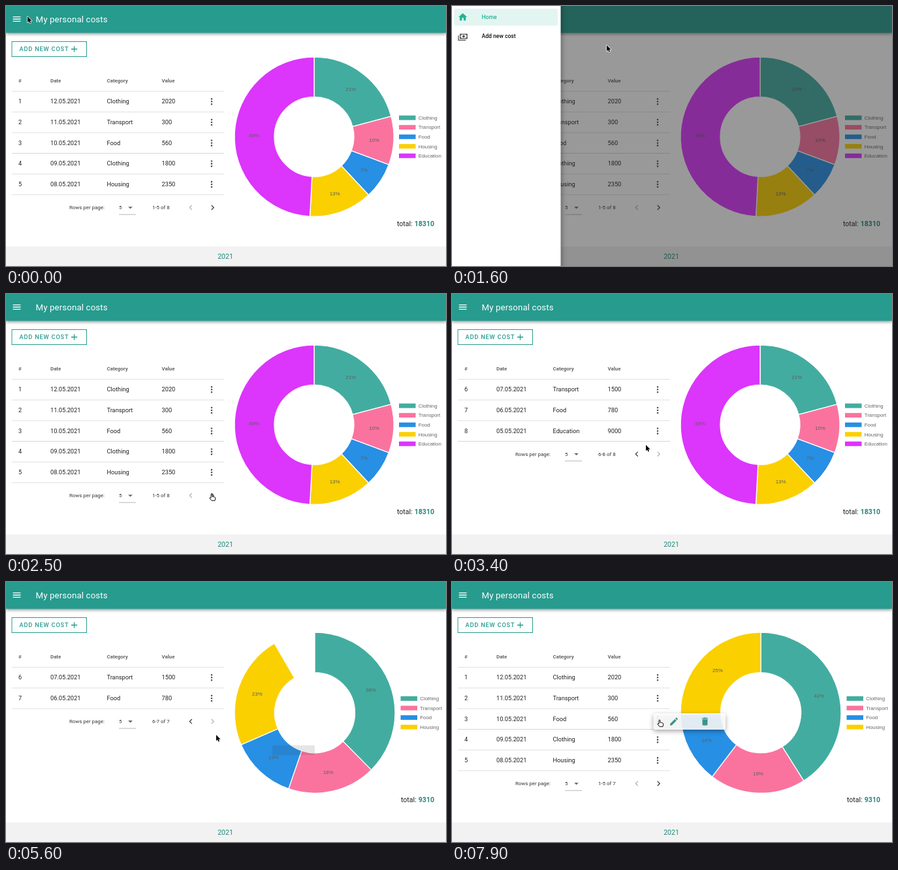
An HTML page with a canvas that plays this animation: 674 by 398 pixels, repeating every 8000 ms.

```html
<!DOCTYPE html>
<html lang="en">
<head>
<meta charset="utf-8">
<title>My personal costs</title>
<style>
  html, body { margin: 0; width: 100%; height: 100%; overflow: hidden; background: #fff; }
  canvas { display: block; width: 674px; height: 398px; }
</style>
</head>
<body>
<canvas id="stage"></canvas>
<script>
const W = 674, H = 398, LOOP = 8000, STEP = 100;
const canvas = document.getElementById('stage');
const ctx = canvas.getContext('2d');
const dpr = window.devicePixelRatio || 1;
canvas.width = W * dpr;
canvas.height = H * dpr;

const SANS = 'Roboto, sans-serif';
const CHART_FONT = '"Liberation Sans", Arial, sans-serif';
const TEAL = '#269b8e', DEEP_TEAL = '#20887c', INK = '#1f1f1f';

// Moments of the interaction, in ms
const OPEN_DRAWER = 550, CLOSE_DRAWER = 1605, NEXT_PAGE = 2750;
const OPEN_MENU = 4230, REMOVE = 5243, PREV_PAGE = 6550, OPEN_MENU_AGAIN = 7660;

const COLORS = {
  Clothing: '#43aca0', Transport: '#fa739f', Food: '#278fe4',
  Housing: '#fbd000', Education: '#dc35fc'
};

const COSTS = [
  ['12.05.2021', 'Clothing', 2020],
  ['11.05.2021', 'Transport', 300],
  ['10.05.2021', 'Food', 560],
  ['09.05.2021', 'Clothing', 1800],
  ['08.05.2021', 'Housing', 2350],
  ['07.05.2021', 'Transport', 1500],
  ['06.05.2021', 'Food', 780],
  ['05.05.2021', 'Education', 9000]
];

// time, x, y of the pointer tip
const PATH = [
  [0, 33, 16], [300, 17, 18], [800, 17, 18], [1600, 237, 60], [1800, 298, 113],
  [2350, 315, 306], [2900, 315, 306], [3400, 297, 231], [4000, 313, 208],
  [4350, 316, 211], [4600, 362, 217], [4850, 386, 212], [5200, 386, 212],
  [5600, 322, 234], [6150, 283, 212], [6700, 283, 212], [7300, 313, 208],
  [7700, 318, 211], [8000, 318, 211]
];
const HAND_TIMES = [[200, 1250], [1700, 1900], [2250, 3000], [3900, 5300], [6050, 6850], [7200, 8000]];

const ICONS = {
  menu: 'M3,6H21V8H3V6M3,11H21V13H3V11M3,16H21V18H3V16Z',
  home: 'M10,20V14H14V20H19V12H22L12,3L2,12H5V20H10Z',
  cash: 'M5,6H23V18H5V6M14,9A3,3 0 0,1 17,12A3,3 0 0,1 14,15A3,3 0 0,1 11,12A3,3 0 0,1 14,9M9,8A2,2 0 0,1 7,10V14A2,2 0 0,1 9,16H19A2,2 0 0,1 21,14V10A2,2 0 0,1 19,8H9M1,10H3V20H19V22H1V10Z',
  pencil: 'M20.71,7.04C21.1,6.65 21.1,6 20.71,5.63L18.37,3.29C18,2.9 17.35,2.9 16.96,3.29L15.12,5.12L18.87,8.87M3,17.25V21H6.75L17.81,9.93L14.06,6.18L3,17.25Z',
  trash: 'M19,4H15.5L14.5,3H9.5L8.5,4H5V6H19M6,19A2,2 0 0,0 8,21H16A2,2 0 0,0 18,19V7H6V19Z',
  left: 'M15.41,16.58L10.83,12L15.41,7.41L14,6L8,12L14,18L15.41,16.58Z',
  right: 'M8.59,16.58L13.17,12L8.59,7.41L10,6L16,12L10,18L8.59,16.58Z',
  plus: 'M19,13H13V19H11V13H5V11H11V5H13V11H19V13Z',
  caret: 'M7,10L12,15L17,10H7Z',
  dots: 'M12,16a2,2 0 1,1 0,4a2,2 0 1,1 0,-4M12,10a2,2 0 1,1 0,4a2,2 0 1,1 0,-4M12,4a2,2 0 1,1 0,4a2,2 0 1,1 0,-4Z'
};
for (const key in ICONS) ICONS[key] = new Path2D(ICONS[key]);

const ARROW = new Path2D('M0,0V9.2L2.1,7.3L3.5,10.4L5,9.7L3.7,6.7H6.6Z');
const HAND = new Path2D('M-1,0.9C-1,-0.3 0.8,-0.3 0.8,0.9V4L2.3,4.2L3.8,4.5L5,5C5.7,5.3 5.8,6 5.7,7L5,10.3H0L-2.8,6.9C-3.6,5.8 -2.4,5 -1.6,5.8L-1,6.4Z');

const clamp = v => Math.max(0, Math.min(1, v));
const lerp = (a, b, p) => a + (b - a) * p;
const smooth = p => p * p * (3 - 2 * p);
const progress = (t, start, length) => clamp((t - start) / length);

function text(str, x, y, size, color, { weight = 400, align = 'left', family = SANS, spacing = 0 } = {}) {
  ctx.font = `${weight} ${size}px ${family}`;
  ctx.letterSpacing = spacing + 'px';
  ctx.textAlign = align;
  ctx.fillStyle = color;
  ctx.fillText(str, x, y + size * 0.355);
}

function icon(name, cx, cy, color, size = 15.8) {
  ctx.save();
  ctx.translate(cx - size / 2, cy - size / 2);
  ctx.scale(size / 24, size / 24);
  ctx.fillStyle = color;
  ctx.fill(ICONS[name], 'evenodd');
  ctx.restore();
}

function box(x, y, w, h, color, radius = 0) {
  ctx.fillStyle = color;
  ctx.beginPath();
  ctx.roundRect(x, y, w, h, radius);
  ctx.fill();
}

function shadowBox(x, y, w, h, color, radius, blur, dy, alpha) {
  ctx.save();
  ctx.shadowColor = `rgba(0,0,0,${alpha})`;
  ctx.shadowBlur = blur * dpr;
  ctx.shadowOffsetY = dy * dpr;
  box(x, y, w, h, color, radius);
  ctx.restore();
}

function drawFrame() {
  shadowBox(0, 0, W, 41, TEAL, 0, 5, 1.5, 0.5);
  icon('menu', 16.5, 20, '#fff');
  text('My personal costs', 45.5, 20, 13.2, '#fff', { spacing: 0.16 });
  box(0, 368, W, 30, '#f2f2f2');
  text('2021', 336, 383.5, 10.56, DEEP_TEAL, { align: 'center' });

  ctx.strokeStyle = TEAL;
  ctx.lineWidth = 1;
  ctx.strokeRect(9, 54.5, 114.5, 23);
  text('ADD NEW COST', 20.5, 66, 9.2, TEAL, { weight: 500, spacing: 0.82 });
  icon('plus', 104.5, 66, TEAL);
}

function drawTable(costs, page) {
  const cols = [19, 68, 154.5, 238.5], pitch = 31.7;
  ['#', 'Date', 'Category', 'Value'].forEach((s, i) =>
    text(s, cols[i], 114.5, 7.9, '#666', { weight: 700 }));

  const first = page * 5;
  const rows = costs.slice(first, first + 5);
  rows.forEach((row, i) => {
    const y = 146 + i * pitch;
    [first + i + 1, ...row].forEach((s, c) => text(String(s), cols[c], y, 9.24, INK));
    icon('dots', 315, y + 0.3, '#555');
  });
  for (let i = 0; i <= rows.length; i++) box(9, 130 + i * pitch, 325, 0.8, '#d6d6d6');

  const y = 150 + rows.length * pitch;
  text('Rows per page:', 97, y, 7.9, '#333');
  text('5', 173, y, 7.9, '#333');
  icon('caret', 190.5, y, '#666');
  box(173, y + 10.3, 26, 0.7, '#999');
  text(`${first + 1}-${first + rows.length} of ${costs.length}`, 224, y, 7.9, '#333');
  icon('left', 283, y, page ? '#444' : '#b5b5b5');
  icon('right', 316.5, y, page ? '#b5b5b5' : '#444');
}

function sumByCategory(costs) {
  const sums = {};
  for (const name in COLORS) {
    const sum = costs.reduce((s, c) => s + (c[1] === name ? c[2] : 0), 0);
    if (sum) sums[name] = sum;
  }
  return sums;
}

const total = costs => costs.reduce((s, c) => s + c[2], 0);

function drawChart(costs, t) {
  const removed = costs.length < COSTS.length;
  const cx = removed ? 473 : 472, cy = 200.2, r = removed ? 123 : 122;
  const before = sumByCategory(COSTS), now = sumByCategory(costs);
  const names = Object.keys(now);
  const p = 1 - Math.pow(1 - progress(t, REMOVE, 1000), 4);
  const top = -Math.PI / 2;

  let at = 0;
  const arcs = names.map(name => {
    const share = lerp(before[name] / total(COSTS), now[name] / total(costs), p);
    const arc = { name, share, from: at, to: at + share };
    at = arc.to;
    return arc;
  });
  const turn = share => top + share * Math.PI * 2;
  for (const a of arcs) {
    ctx.beginPath();
    ctx.arc(cx, cy, r, turn(a.from), turn(a.to));
    ctx.arc(cx, cy, r / 2, turn(a.to), turn(a.from), true);
    ctx.closePath();
    ctx.fillStyle = COLORS[a.name];
    ctx.fill();
    ctx.strokeStyle = '#fff';
    ctx.lineWidth = 1.3;
    ctx.stroke();
  }
  for (const a of arcs) {
    const mid = turn((a.from + a.to) / 2), d = r * 0.755;
    text(Math.round(a.share * 100) + '%', cx + Math.cos(mid) * d, cy + Math.sin(mid) * d,
      7.9, '#5f5f5f', { align: 'center', family: CHART_FONT });
  }

  const lx = removed ? 604.5 : 602;
  names.forEach((name, i) => {
    const y = 200.2 + (i - (names.length - 1) / 2) * 14.55;
    box(lx, y - 3.5, 25.5, 7, COLORS[name]);
    text(name, lx + 29.7, y, 7.9, '#666', { family: CHART_FONT });
  });

  const sum = String(total(costs));
  text(sum, 656, 333.3, 10.56, DEEP_TEAL, { weight: 700, align: 'right' });
  text('total:', removed ? 605 : 599, 333.3, 10.56, INK);
}

function drawMenu(alpha, dx, hover) {
  if (alpha <= 0) return;
  ctx.save();
  ctx.globalAlpha = alpha;
  shadowBox(307 + dx, 201, 112 - dx, 25, '#fff', 2.5, 7, 2.5, 0.4);
  if (hover) box(hover - 19, 201, 38, 25, 'rgba(38,155,142,0.08)');
  icon('pencil', 338.5 + dx, 213.5, DEEP_TEAL);
  icon('trash', 386 + dx, 213.5, DEEP_TEAL);
  ctx.restore();
}

function drawDrawer(t) {
  const closing = t >= CLOSE_DRAWER;
  const start = closing ? CLOSE_DRAWER : OPEN_DRAWER;
  const fade = Math.pow(1 - progress(t, start, 300), 2);
  const slide = smooth(progress(t, start, 200));
  const dim = closing ? fade : 1 - fade;
  const shown = closing ? 1 - slide : slide;
  if (t < OPEN_DRAWER || dim <= 0) return;

  box(0, 0, W, H, `rgba(33,33,33,${0.46 * dim})`);
  if (shown < 0.03) return;
  ctx.save();
  ctx.translate(-166.5 * (1 - shown), 0);
  shadowBox(0, -10, 166.5, H + 20, '#fff', 0, 8, 2, 0.45);
  box(3, 4, 159, 26, '#e3f5f1', 3);
  icon('home', 16.5, 17, '#20b397');
  text('Home', 45.5, 17, 8.58, '#20b397', { weight: 500 });
  icon('cash', 16.5, 46.5, '#555');
  text('Add new cost', 45.5, 46, 8.58, '#111', { weight: 500 });
  ctx.restore();
}

function drawPointer(t) {
  const i = PATH.findIndex((k, n) => n > 0 && t <= k[0]);
  const [t0, x0, y0] = PATH[i - 1], [t1, x1, y1] = PATH[i];
  const p = smooth((t - t0) / (t1 - t0));
  const hand = HAND_TIMES.some(([a, b]) => t >= a && t < b);
  ctx.save();
  ctx.translate(lerp(x0, x1, p), lerp(y0, y1, p));
  ctx.lineJoin = 'round';
  ctx.lineWidth = hand ? 1 : 1.5;
  ctx.strokeStyle = hand ? '#111' : '#fff';
  ctx.fillStyle = hand ? '#fff' : '#000';
  const shape = hand ? HAND : ARROW;
  if (hand) { ctx.fill(shape); ctx.stroke(shape); }
  else { ctx.stroke(shape); ctx.fill(shape); }
  ctx.restore();
}

function draw(t) {
  ctx.setTransform(dpr, 0, 0, dpr, 0, 0);
  box(0, 0, W, H, '#fff');
  const costs = t < REMOVE ? COSTS : COSTS.slice(0, 7);
  const page = t >= NEXT_PAGE && t < PREV_PAGE ? 1 : 0;

  drawFrame();
  drawTable(costs, page);
  drawChart(costs, t);
  if (t >= REMOVE) {
    const fade = 1 - progress(t, 5300, 400);
    if (fade > 0) box(408, 250, 65, 15, `rgba(60,60,60,${0.5 * fade})`, 2);
  }

  if (t < 5300) {
    const hover = t < 4500 ? 0 : t < 4700 ? 338.5 : 386;
    drawMenu(progress(t, OPEN_MENU, 200) * (1 - progress(t, 5150, 150)), 0, hover);
  } else {
    drawMenu(0.88 * progress(t, OPEN_MENU_AGAIN, 200), 1.5, 0);
  }
  drawDrawer(t);
  drawPointer(t);
}

const began = performance.now();
function tick() {
  const t = (performance.now() - began) % LOOP;
  draw(Math.floor(t / STEP) * STEP);
  requestAnimationFrame(tick);
}
tick();
</script>
</body>
</html>
```
